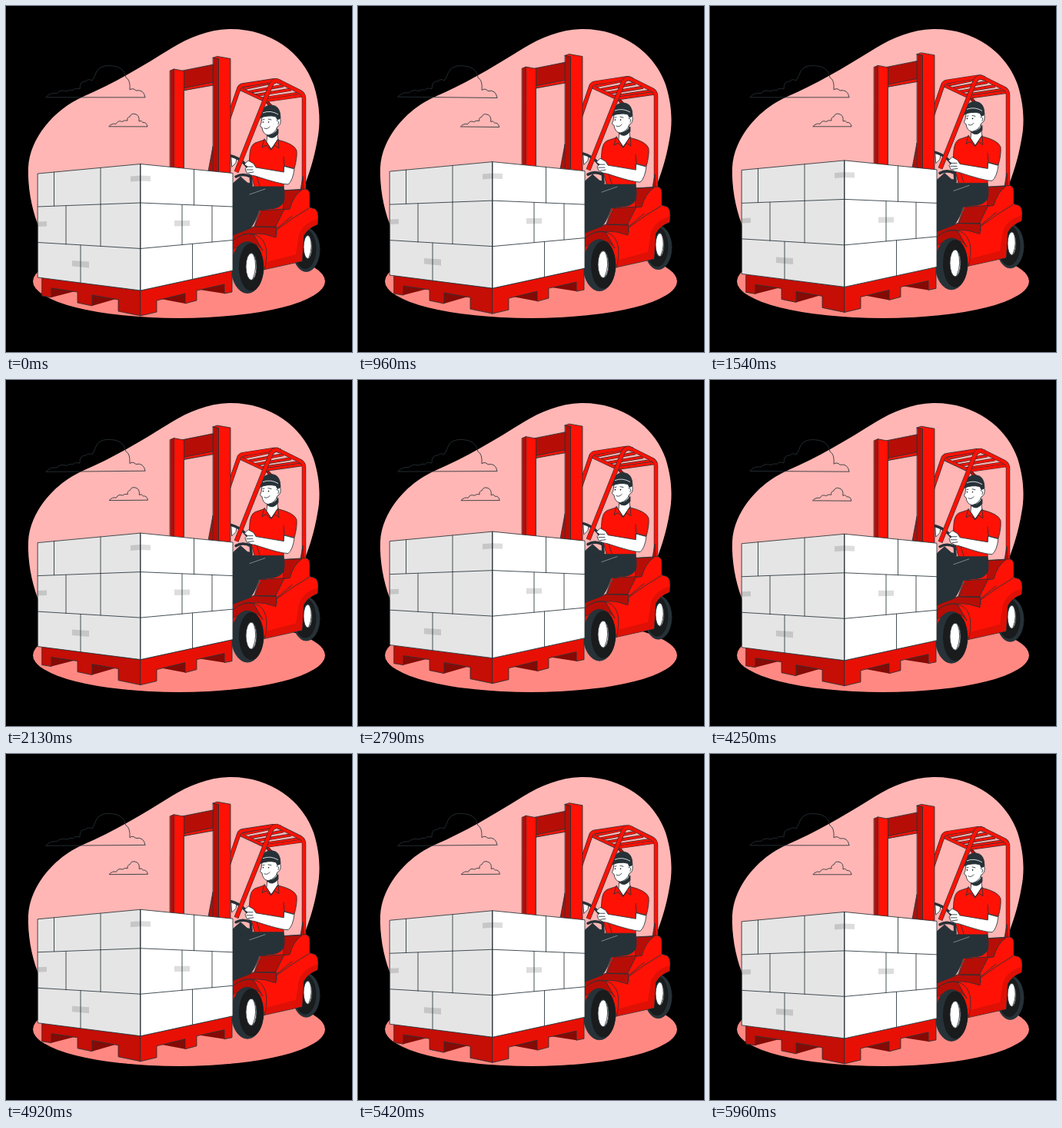
These frames come from a looping animation (450 px wide and 450 px high, 6 s). An HTML page:

```html
<!DOCTYPE html>
<html lang="en">
<head>
<meta charset="utf-8">
<title>Forklift</title>
<style>
html, body { margin: 0; width: 100%; height: 100%; overflow: hidden; background: #000; }
svg { display: block; width: 100vw; height: 100vh; }
.line, .r, .m, .s, .d, .w, .k, .g { stroke: #263238; stroke-width: .85; stroke-linejoin: round; stroke-linecap: round; }
.line { fill: none; }
.r { fill: #ff1205; }
.m { fill: #e81005; }
.s { fill: #c40e06; }
.d { fill: #b60e06; }
.w { fill: #fff; }
.k { fill: #263238; }
.g { fill: #e5e5e5; }
.deep { fill: #850a05; }
.tyre { fill: #191b1c; }
.tape { fill: #000; opacity: .13; }
.tube path { fill: none; stroke-linejoin: round; }
</style>
</head>
<body>
<svg viewBox="0 0 450 450">
  <path fill="#ffb6b4" d="M290 30C343 29 385 60 400 102C409 130 409 155 405 174C401 198 394 219 386 240L340 330H75C55 314 46 298 41 283C33 262 28 234 29 210C31 172 62 135 100 118C140 101 178 78 215 55C238 41 262 31 290 30Z"/>
  <ellipse cx="225" cy="358" rx="190" ry="48" fill="#ff8982"/>

  <g id="clouds" class="line">
    <path d="M52 118.500Q58 112 66 113.500Q72 108 79 111Q83 108 87 109.500Q90 106 96 108Q96 97 104 98Q107 94 112 97Q116 91 117 87Q121 77 135 77.500Q154 78 156 93Q162 96 161 109Q165 106 169 110Q179 108 181 118.500Z"/>
    <path d="M134 156.500Q138 152 143 153.500Q146 148 151 150.500Q154 148 158 149Q157 145 161 144Q163 139 168 140.500Q174 142 173 150Q176 148 178 151.500Q183 151 184 156.500Z"/>
  </g>

  <g id="truck">
    <g id="frame" class="tube"></g>
    <path class="d" d="M386 222L383 239H387Z"/>

    <!-- rear wheel and body -->
    <ellipse class="k" cx="390.500" cy="317" rx="17.500" ry="28.500"/>
    <ellipse class="tyre" cx="389" cy="316" rx="14.500" ry="26"/>
    <ellipse class="w" cx="392.500" cy="313.500" rx="5.500" ry="15"/>
    <path class="line" d="M395 299Q400 313 394 327"/>
    <path class="r" d="M357 240L390 238Q395 239 395 246V262L402 264Q406 267 406 275L405 284Q392 289 387 299L385 332L335 343Q338 314 319 298L330 266Z"/>
    <path class="d" d="M361 240L385 239Q374 246 369 264L361 265Z"/>
    <path fill="#df1005" d="M405.500 277Q388 281 381 297L377 323L337 333.500L335.500 342.500L385 331.500L387 299Q392 289 405 284Z"/>
    <path class="d" d="M333 266L362 264L351 286L352 297L322 292Z"/>
    <path class="d" d="M296 310Q313 292 337 297L351 301L352 288L322 287L296 297Z"/>
    <path class="line" d="M352 291Q373 275 394 263M326 287L351 287M353 289L372 273"/>

    <!-- driver -->
    <path class="k" d="M295 231L318 235L361 234Q363 248 361 255Q356 264 342 264L329 266Q325 280 318 289L295 298Z"/>
    <path class="line" style="stroke:#8b969b" d="M317 245L337 238"/>
    <path class="w" d="M340 164L339 177L345 186L354 175L352 157Z"/>
    <path class="k" d="M339 165Q346 171 354 160V166Q347 175 340 169Z"/>
    <path class="r" d="M336 174L324 178Q318 181 317 192L316 207L323 235L361 235L362 208L375 211.500Q379 197 378 188Q375 179 353 174L345 187Z"/>
    <path class="r" d="M336 173L333 184L338 181L345 187L349 181L355 185L354 173L345 186Z"/>
    <path class="line" d="M362 208L361 196M330 234Q326 222 324 214"/>
    <path class="w" d="M333 144L332 152Q329 157 333 158Q334 167 341 168Q350 166 353 157Q358 155 357 147L352 142Z"/>
    <path class="k" d="M330 146Q328 141 333 137Q336 128.500 346 129Q357 130 357 146L353 148L351 144Q340 141 330 146Z"/>
    <path fill="none" stroke="#fff" stroke-width=".8" d="M334 139Q344 135 354 141"/>
    <path class="line" d="M334 148L336 147.500M341 147L345 148M336 159Q340 161 343 157M352 149Q356 149 354 154"/>
    <circle cx="334.500" cy="151" r=".8"/><circle cx="341.500" cy="151" r=".8"/>

    <!-- steering -->
    <path class="w" d="M293 194L300 197L299 204L294 209Z"/>
    <path class="k" d="M296 230L305 222L314 230L320 231V236L297 238Z"/>
    <path class="line" style="stroke-width:3.500" d="M293 195Q313 201 318 219L319 233M299 222Q308 217 318 222"/>
    <path class="w" d="M362 208.500L375 212Q373 227 367 232Q357 232 324 221Q319 221 313 217L311 212L314 209L310 206L315 201L322 205L325 210L361 216Z"/>
    <path class="line" d="M314 209L321 209M313 213L321 213M315 217L322 216"/>

    <g id="post" class="tube"></g>

    <!-- front wheel -->
    <path class="r" d="M295 306Q310 291 326 298Q345 308 336 343L331 340L295 330Z"/>
    <path class="d" d="M295 305Q308 294 322 297L334 318Q325 302 295 316Z"/>
    <ellipse class="k" cx="314" cy="340" rx="21" ry="33.500"/>
    <ellipse class="tyre" cx="319" cy="339.500" rx="16" ry="31"/>
    <ellipse class="w" cx="319" cy="339" rx="7" ry="17.500"/>
    <path class="line" d="M322 323Q328 339 321 355"/>

    <!-- mast -->
    <path class="d" d="M269 183L263 215H270Z"/>
    <path class="d" d="M230 84L270 76V102L230 110Z"/>
    <path class="r" d="M230 107L270 99V103L230 110Z"/>
    <path class="d" d="M213.500 84L218.500 82V215H213.500Z"/>
    <path class="r" d="M218.500 82L231.500 84.500V215H218.500Z"/>
    <path class="r" d="M275 65.500L292 68.500V218H276.500V69L269 67.500Z"/>
    <path class="d" d="M269.500 67.500L276.500 69V218H269.500Z"/>

    <!-- pallet -->
    <path class="deep" d="M59 366V379L90 371ZM112 375V390L143 381ZM196 380L233 387V373ZM252 369L284 374V361Z"/>
    <path class="s" d="M47 353L175 370V403L146 397V382L112 376V390L93 386V372L59 367V379L47 377Z"/>
    <path class="m" d="M175 370L294 344V372L284 374V362L248 370V383L233 387V374L196 383V398L175 403Z"/>

    <!-- boxes -->
    <path class="g" d="M41.500 218L175 205.500V370L41.500 353Z"/>
    <path class="w" d="M175 205.500L295 217.500V344L175 370Z"/>
    <g class="tape">
      <path d="M162 221.500L175 220.500L188 221V228L175 227.500L162 228.500Z"/>
      <path d="M219 279L239 279V286L219 286.500Z"/>
      <path d="M86 331L108 332.500V340.500L86 338.500Z"/>
      <path d="M41.500 280.500L53 280V286.500L41.500 287Z"/>
    </g>
    <path class="line" d="M41.500 261L175 256L295 261M41.500 307.500L175 315.500L295 304.500M175 206V370
      M62.500 216V260M123 210.500V258M78 260V310M123 258V312.500M97 311V360
      M244.500 212.500V259M229 258.500V310.500M268 260V307M242.500 309.500V355"/>
  </g>
</svg>
<script>
const $ = id => document.getElementById(id);

// A red pipe with a thin dark outline
const tube = (d, w, color = '#ff1205') =>
  `<path d="${d}" stroke="#263238" stroke-width="${w + 1.3}"/><path d="${d}" stroke="${color}" stroke-width="${w}"/>`;

const slats = [0, 1, 2, 3].map(i =>
  tube(`M${308 + i * 8} ${107.5 + i * 4.4}L${351 + i * 10} ${98.5 + i * 5}`, 2.8)).join('');

$('frame').innerHTML =
  tube('M338 123L346 132', 3, '#b60e06') + slats +
  tube('M288 150L303 107L337 123L387 116', 3.4) +
  tube('M289 148L303 107Q304 104 308 103L347 97Q352 96.500 356 98.500L383 112Q387.500 115 387.500 120V240', 4.2);
$('post').innerHTML = tube('M299.500 216L344 104Q347 97 352 97L357 99', 4.8);

const LOOP = 6000, LIFT = 9;

function draw(now) {
  const t = now % LOOP;
  const lift = LIFT * (1 - Math.abs(t / (LOOP / 2) - 1));
  const sway = 0.6 * Math.sin(t / 3000 * 2 * Math.PI);
  $('truck').setAttribute('transform', `translate(0 ${-lift})`);
  $('clouds').setAttribute('transform', `rotate(${sway} 118 118)`);
  requestAnimationFrame(draw);
}
requestAnimationFrame(draw);
</script>
</body>
</html>
```
